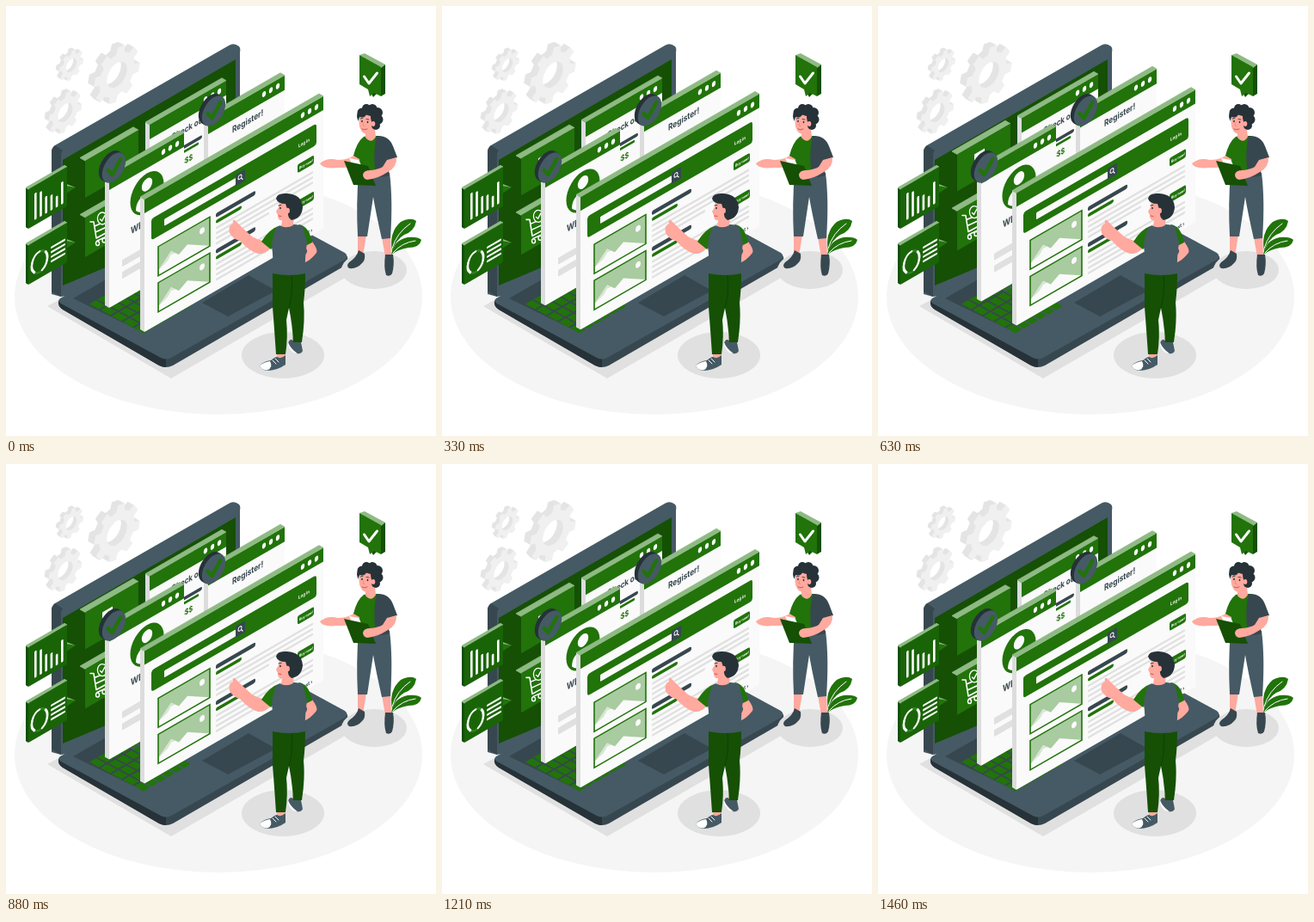
Write an HTML page that moves like this. It is 500 px wide and 500 px high and loops after 1.5 s.

```html
<!DOCTYPE html>
<html lang="en">
<head>
<meta charset="utf-8">
<title>Isometric web shop</title>
<style>
html, body { margin: 0; width: 100%; height: 100%; overflow: hidden; background: #fff; }
svg { display: block; width: 100%; height: 100%; }
text { font-family: Inter, "Open Sans", sans-serif; font-weight: 700; }
</style>
</head>
<body>
<svg id="stage" viewBox="0 0 500 500" xmlns="http://www.w3.org/2000/svg"></svg>
<script>
const GREEN = '#21730a', DEEP = '#155005', PALE = '#8fba84';
const SLATE = '#455a64', DARK = '#37474f', INK = '#263238';
const SKIN = '#ffa99f', WHITE = '#fafafa', GREY = '#e0e0e0';
const K = 0.577, PERIOD = 1500, STEPS = 36, LIFT = 8;

const path = (d, fill, more = '') => `<path d="${d}" fill="${fill}" ${more}/>`;
const line = (d, color, w, more = '') =>
  `<path d="${d}" fill="none" stroke="${color}" stroke-width="${w}" stroke-linecap="round" stroke-linejoin="round" ${more}/>`;
const rect = (x, y, w, h, fill, r = 0, more = '') =>
  `<rect x="${x}" y="${y}" width="${w}" height="${h}" rx="${r}" fill="${fill}" ${more}/>`;
const oval = (x, y, rx, ry, fill, more = '') =>
  `<ellipse cx="${x}" cy="${y}" rx="${rx}" ry="${ry}" fill="${fill}" ${more}/>`;
const iso = (x, y, inner) => `<g transform="matrix(1 ${-K} 0 1 ${x} ${y})">${inner}</g>`;
const label = (x, y, size, fill, str) =>
  `<text transform="matrix(.8 0 0 1 ${x} ${y})" font-size="${size}" fill="${fill}">${str}</text>`;

// Extruded slab whose face starts at (x, y) and runs up to the right
function slab(x, y, w, h, d, face, side, top, inner = '') {
  const e = d * K, rise = w * K;
  return path(`M${x} ${y}l${-d} ${-e}v${h}l${d} ${e}Z`, side) +
    path(`M${x} ${y}l${-d} ${-e}l${w} ${-rise}l${d} ${e}Z`, top,
      `stroke="${top}" stroke-width=".8" stroke-linejoin="round"`) +
    iso(x, y, rect(0, 0, w, h, face, 1) + inner);
}

function browser(x, y, w, h, head, inner) {
  const dots = [24, 16, 8].map(k => oval(w - k, 8, 2.2, 3.2, '#fff')).join('');
  return slab(x, y, w, h, 5, WHITE, '#dcdcdc', PALE,
    rect(0, 0, w, head, GREEN) + dots + inner);
}

function gear(cx, cy, r, depth) {
  const teeth = 8, pts = [];
  for (let i = 0; i < teeth; i++)
    [[-.3, .77], [-.2, 1], [.2, 1], [.3, .77]].forEach(([o, q]) => {
      const a = (i + o) / teeth * 2 * Math.PI + .2;
      pts.push((r * q * Math.cos(a)).toFixed(1) + ' ' + (r * q * Math.sin(a)).toFixed(1));
    });
  const b = r * .44;
  const d = `M${pts.join('L')}ZM${b} 0A${b} ${b} 0 1 0 ${-b} 0A${b} ${b} 0 1 0 ${b} 0Z`;
  let out = '';
  for (let k = depth; k >= 0; k--)
    out += `<g transform="matrix(.866 -.5 0 1 ${cx - k} ${cy - k * K})">` +
      path(d, k ? '#e4e4e4' : '#f0f0f0', 'fill-rule="evenodd"') + '</g>';
  return out;
}

function badge(x, y) {
  const disc = (dx, dy, c) =>
    `<g transform="matrix(.866 -.5 0 1 ${x + dx} ${y + dy})"><circle r="15.8" fill="${c}"/></g>`;
  let out = '';
  for (let k = 4; k > 0; k--) out += disc(-k, -k * K, INK);
  return out + disc(0, 0, SLATE) +
    line(`M${x - 7} ${y + 3}L${x - 2} ${y + 8}L${x + 8} ${y - 10}`, GREEN, 4.5);
}

function keys() {
  let out = path('M78 340L118 317L190 354L152 376Z', DARK);
  for (let row = 0; row < 5; row++)
    for (let col = 0; col < 6; col++) {
      const x = 97 + row * 13 + col * 9.4, y = 346.5 + row * 7 - col * 5.4;
      out += path(`M${x} ${y}l7.6 -4.4l11 5.9l-7.6 4.4Z`, GREEN);
    }
  return out;
}

function laptop() {
  return path('M48 349L192 433L408 308L270 230Z', GREY) +
    path('M53 170Q53 165 57 162L259 46Q265 42 271 47Q273 49 272 54V300L64 338L53 335Z', SLATE) +
    path('M53 170Q53 165 57 162L66 168Q64 170 64 174V338L53 332Z', DARK) +
    path('M66 179L267 62V240L66 325Z', DEEP) +
    path('M61 343Q60 349 66 353L178 418Q186 422 194 418L394 302Q398 299 397 291L186 400Z', DARK) +
    path('M61 343Q60 349 66 353L178 418Q182 420 186 420V407L80 340Z', INK) +
    path('M63 340L272 221L394 287Q399 291 394 295L192 409Q186 412 180 409L64 346Q59 343 63 340Z', SLATE) +
    keys() + path('M228 345L282 313L314 331L258 361Z', DARK);
}

function chartBubble() {
  const hs = [31, 29, 20, 18, 13, 26];
  const bars = hs.map((h, i) => rect(7 + i * 6.2, 40 - h, 2.6, h, '#fff', 1)).join('');
  return path('M65 205L81 211L67 220Z', GREEN) + path('M65 205L81 211L70 209Z', PALE) +
    slab(26, 213, 45, 46, 3, '#1a6408', DEEP, PALE, bars);
}

function ringBubble() {
  const rows = [0, 1, 2, 3].map(i => rect(26, 17 + i * 5.4, 17, 2.4, '#fff', 1)).join('');
  return path('M65 269L81 275L67 284Z', GREEN) + path('M65 269L81 275L70 273Z', PALE) +
    slab(26, 278, 45, 46, 3, '#1a6408', DEEP, PALE,
      oval(13, 27, 9, 12, 'none', 'stroke="#2f8020" stroke-width="2.6"') +
      line('M13 15A9 12 0 0 0 7 36M16 38A9 12 0 0 0 20 19', '#fff', 2.6) + rows);
}

function cartTile() {
  const cart = line('M98 251L102 251L105 270L116 264M103 256L117 250M104 263L117 257M106 273L117 268', '#fff', 1.6) +
    oval(106.5, 276, 2, 2.5, 'none', 'stroke="#fff" stroke-width="1.4"') +
    oval(114, 272.5, 2, 2.5, 'none', 'stroke="#fff" stroke-width="1.4"') +
    oval(112, 247, 5.6, 7, GREEN, 'stroke="#fff" stroke-width="1.3"') +
    line('M109.5 248L111.5 250L115 243.5', '#fff', 1.4);
  return slab(92, 246, 62, 46, 6, GREEN, DEEP, PALE) + cart;
}

function picture(y) {
  return rect(16, y, 60, 34, '#a9cba0', 0) +
    path(`M17 ${y + 33}V${y + 27}L31 ${y + 14}L40 ${y + 23}L50 ${y + 17}L75 ${y + 33}Z`, WHITE) +
    path(`M17 ${y + 27}L31 ${y + 14}L36 ${y + 19}L31 ${y + 18}L27 ${y + 23}Z`, '#d5e6d0') +
    oval(67, y + 11, 3, 3.6, WHITE) +
    rect(16, y, 60, 34, 'none', 0, `stroke="${GREEN}" stroke-width="1.6"`);
}

function offer(y) {
  const rows = [16, 22, 28].map(k => rect(83, y + k, 113, 2.6, GREY, 1)).join('');
  return rect(83, y, 46, 5, DARK, 2) + rect(83, y + 8, 30, 4, GREEN, 2) + rows +
    rect(83, y + 34, 62, 2.6, GREY, 1) + rect(178, y - 2, 19, 10, GREEN, 2) +
    label(180, y + 4.8, 4.4, '#fff', 'Buy now!');
}

function floating() {
  const checkout = browser(167, 138, 89, 100, 17,
    label(25, 33, 10, DARK, 'Check out') + rect(35, 47, 26, 4, DARK, 2) +
    rect(35, 53, 22, 3, GREEN, 1) + label(36, 69, 9, GREEN, '$$$'));
  const register = browser(235, 132, 89, 80, 17, label(28, 32, 10.3, DARK, 'Register!'));
  const welcome = browser(120, 198, 87, 153, 16,
    oval(44, 45, 19.5, 23, GREEN) + oval(44, 35, 6.2, 7.2, WHITE) +
    path('M31 58Q31 45 44 45Q57 45 57 58Q52 65 44 65Q36 65 31 58Z', WHITE) +
    label(25, 82, 11, DARK, 'WELCOME') +
    rect(15, 106, 60, 8, GREY, 1) + rect(15, 120, 60, 8, GREY, 1));
  const shop = browser(161, 225, 208, 154, 16,
    rect(8, 27, 192, 25, GREEN, 3) + rect(23, 36, 83, 8, WHITE, 1) +
    rect(106, 32.5, 11, 13, DARK, 1) +
    oval(111, 38, 2, 2.4, 'none', 'stroke="#fff" stroke-width="1"') +
    line('M112.6 40L114.2 42.5', '#fff', 1) +
    label(179, 43, 5.5, '#fff', 'Log in') +
    picture(64) + picture(106) + offer(64) + offer(106) +
    label(181, 150, 6, DARK, 'Next ›'));
  return slab(92, 180, 62, 43, 6, GREEN, DEEP, PALE) +
    path('M112 180L124 173V190L112 196Z', WHITE) +
    cartTile() + checkout + register + welcome + shop;
}

function tickBubble() {
  return path('M411 57L417 55L441 68L436 72Z', PALE) +
    path('M436 72L441 68V102L436 105Z', DEEP) +
    path('M422 97L431 102L427 106Z', DEEP) +
    path('M411 57L436 71V105L428 101L423 105L421 97L411 91Z', GREEN) +
    line('M416.5 82L422 90L431.5 78', '#fff', 3);
}

function plant() {
  return path('M449 285Q445 263 459 251Q471 245 477 250Q475 262 463 266Q453 272 449 285Z', GREEN) +
    path('M448 289Q451 272 467 269Q479 268 483 272Q481 281 468 281Q456 283 448 289Z', GREEN) +
    line('M449 282Q454 264 470 253M450 287Q460 275 476 273', '#fff', 1);
}

function woman() {
  const curls = [[414, 124, 5.5], [419, 119, 5], [426, 119.5, 5.5], [432, 124, 6], [433, 132, 5.5], [430, 139, 5]];
  return oval(428, 307, 38, 22, GREY) + plant() +
    path('M409 266H419L415 291L409 290ZM437 269H447L448 292H441Z', SKIN) +
    path('M410 284L417 288Q418 296 414 299Q408 306 399 305Q395 302 399 298Q408 292 410 284Z', DARK) +
    path('M441 289H450Q452 300 449 311Q447 315 442 313Q439 304 441 289Z', DARK) +
    path('M410 194L446 194Q450 225 447 270L437 271Q430 240 427 222L420 268L409 268Q407 230 410 194Z', SLATE) +
    path('M411 167Q403 179 386 179Q373 176 365 183Q368 190 385 188Q406 189 415 177Z', SKIN) +
    path('M416 152Q425 149 436 152L443 162L441 196Q425 201 410 196Q412 185 411 178L404 174Q408 158 416 152Z', GREEN) +
    path('M431 151Q445 150 450 163L455 176L443 180L446 197Q438 200 430 198Q426 170 431 151Z', DARK) +
    path('M418 143H429L430 152Q425 161 418 153Z', SKIN) +
    path('M399 177L410 179L413 185L402 183Z', '#fff') +
    path('M393 180L421 186L430 209L404 208Z', DEEP) +
    path('M443 179L454 176Q455 187 444 193Q432 201 420 202Q415 201 415 196Q416 191 424 191Q433 190 438 187Z', SKIN) +
    oval(420, 136, 9.5, 13, SKIN) +
    curls.map(([x, y, r]) => oval(x, y, r, r, INK)).join('') +
    path('M410 122Q406 128 410 134Q410 127 417 126L424 128Q424 135 427 137L434 136L436 123L422 117Z', INK) +
    oval(427, 137, 2.3, 3, SKIN) + oval(414, 134, .8, 1.2, INK) + oval(420.5, 135, .8, 1.2, INK) +
    line('M412 131L415 130.5M419 131.5L422 132', INK, .8) +
    line('M416 136L415 139L417 139.4', '#ea7f78', .7) + line('M414 143Q417 145 420 143', '#b7463f', .8);
}

function man() {
  return oval(322, 406, 48, 27, GREY) +
    path('M333 385H343V394H334ZM315 402H325L324 412H315Z', SKIN) +
    path('M334 389L343 391L345 401Q343 405 338 404Q330 399 328 392Q330 386 334 389Z', SLATE) +
    path('M328 391Q331 399 339 404L334 403Q327 397 328 391Z', '#fff') +
    path('M325 406V417Q315 424 304 424Q296 423 295 418Q300 413 308 412Q313 408 315 408Q320 411 325 406Z', SLATE) +
    path('M307 413Q300 414 295 418Q296 423 304 423.5Q311 420 307 413Z', '#fff') +
    line('M310 412L314 416M313 410L317 414', '#fff', 1) +
    path('M310 309Q330 315 348 309Q348 330 346 345Q348 365 344 391L334 391Q333 370 329 351L326 365Q328 385 325 405L314 405Q312 375 310 350Z', DEEP) +
    path('M332 312Q334 335 329 351', 'none', 'stroke="#0f4004" stroke-width="1"') +
    path('M347 277L356 274Q363 283 361 287Q354 296 346 299V291Q351 287 350 284Z', SKIN) +
    path('M298 273Q291 271 286 268L274 257L266 249Q263 248 264 253Q258 255 260 264Q264 271 272 273Q284 286 293 288Q302 289 308 281Z', SKIN) +
    path('M319 255Q306 259 297 274L308 283L316 274Z', GREEN) +
    path('M340 254Q352 255 356 275L346 280Z', GREEN) +
    path('M315 257Q330 251 345 256L350 275Q347 295 348 311Q330 315 310 311Q311 290 309 280Q310 265 315 257Z', SLATE) +
    path('M318 226L330 226L335 244L334 255Q327 259 320 256L321 249Q316 250 316 243L314 239L317 234Z', SKIN) +
    path('M314 224Q315 217 327 218Q344 219 345 234Q344 247 332 249Q327 246 328 239L325 230Q316 230 314 224Z', INK) +
    oval(327.5, 238, 2.4, 3.2, SKIN) + oval(319, 235, .8, 1.2, INK) +
    line('M317 232L320 231.5', INK, .9) + line('M317 244L320 244.5', '#b7463f', .8);
}

const stage = document.getElementById('stage');
stage.innerHTML = oval(247, 338, 237, 137, '#f5f5f5') +
  gear(76, 69, 16.5, 4) + gear(129, 80, 31, 7) + gear(69, 124, 22.5, 5) +
  laptop() + chartBubble() + ringBubble() +
  `<g id="float">${floating()}</g>` +
  badge(125.5, 188) + badge(241.5, 122) + tickBubble() + woman() + man();

const float = document.getElementById('float');
function draw(ms) {
  const step = Math.floor((ms + 2) % PERIOD / (PERIOD / STEPS));
  const y = -LIFT / 2 * (1 - Math.cos(2 * Math.PI * step / STEPS));
  float.setAttribute('transform', `translate(0 ${y.toFixed(2)})`);
}
function tick(now) {
  draw(now);
  requestAnimationFrame(tick);
}
draw(0);
requestAnimationFrame(tick);
</script>
</body>
</html>
```
